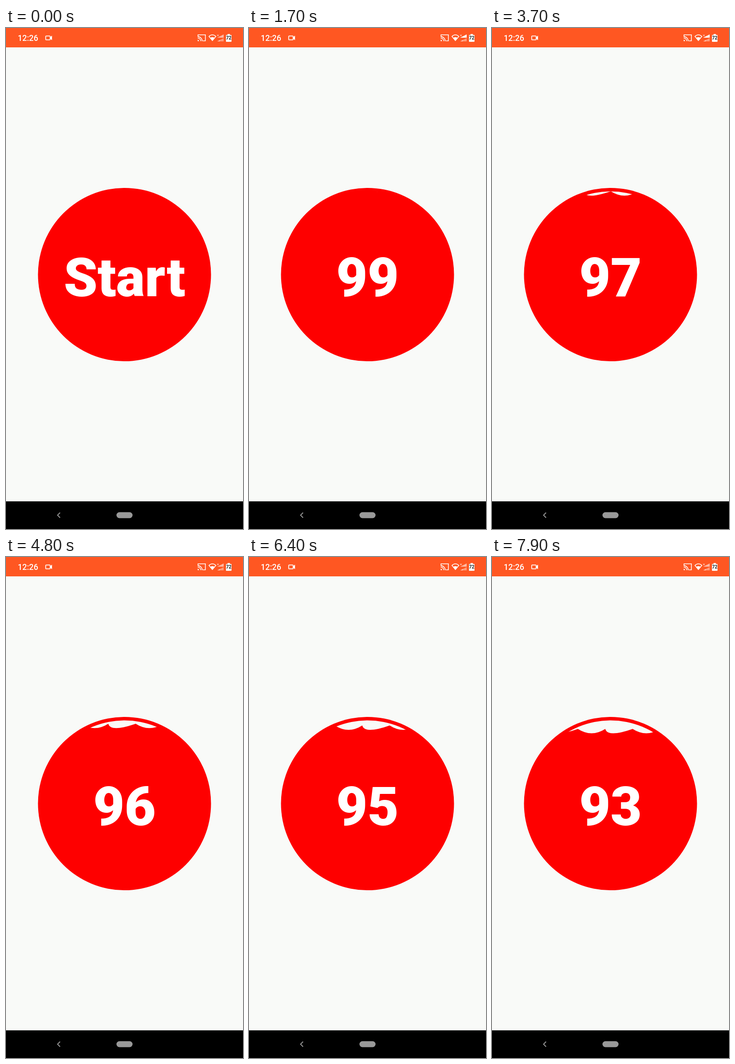
These frames come from a looping animation (515x1087 px, 8000 ms). An HTML page:

```html
<!DOCTYPE html>
<html lang="en">
<head>
<meta charset="utf-8">
<title>Countdown</title>
<style>
html, body { margin: 0; width: 100%; height: 100%; overflow: hidden; background: #f9faf8; }
svg { display: block; width: 515px; height: 1087px; font-family: Roboto, sans-serif; }
</style>
</head>
<body>
<svg viewBox="0 0 515 1087">
  <defs>
    <clipPath id="inside"><circle cx="257.5" cy="535" r="180.5"/></clipPath>
  </defs>
  <rect width="515" height="1087" fill="#f9faf8"/>

  <!-- status bar -->
  <rect width="515" height="42" fill="#ff5722"/>
  <g fill="#fff">
    <text x="25.5" y="28" font-size="17.5" font-weight="500">12:26</text>
    <path d="M96 20l4-3.5v10l-4-3.5z"/>
    <rect x="86.3" y="17.3" width="9.6" height="8.4" rx="1" fill="none" stroke="#fff" stroke-width="1.7"/>
    <g fill="none" stroke="#fff" stroke-width="1.6">
      <path d="M417.3 18v-3.2h16v12.9h-5.6M416.5 21.7a6.8 6.8 0 0 1 6.8 6.8M416.5 18.6a9.9 9.9 0 0 1 9.9 9.9"/>
    </g>
    <path d="M416.5 25.6a2.9 2.9 0 0 1 2.9 2.9h-2.9z"/>
    <path d="M441 18.2q7.5-7 15 0L448.500 27.300z" fill="none" stroke="#fff" stroke-width="1.5"/>
    <path d="M443.5 21.500q5-3.500 10 0L448.500 28z"/>
    <path d="M473 14v7h-14z" fill-opacity=".4"/>
    <path id="signal" d="M473 14v7h-14z"/>
    <path d="M473 22v7h-14z" fill-opacity=".4"/>
    <path d="M465 26v3h-6z" fill-opacity=".5"/>
    <path d="M459 14.500l3 3M462 14.500l-3 3" stroke="#fff"/>
    <path d="M481.500 13h5v2h2.500q1 0 1 1v13q0 1-1 1h-10q-1 0-1-1v-13q0-1 1-1h2.500z"/>
  </g>
  <text x="484" y="25" font-size="10" font-weight="700" text-anchor="middle" fill="#222">72</text>

  <!-- button -->
  <circle cx="257.5" cy="535" r="188" fill="#fe0000"/>
  <text id="label" x="257.5" y="581.5" font-size="117.500" font-weight="900" text-anchor="middle" fill="#fff"></text>
  <circle id="press" cx="257.5" cy="535" r="180.5" fill-opacity=".13"/>
  <path id="wave" clip-path="url(#inside)" fill="#f9faf8"/>

  <!-- navigation bar -->
  <rect y="1027" width="515" height="60"/>
  <path d="M117.500 1051.500l-5.500 5.500 5.500 5.500" fill="none" stroke="#999" stroke-width="1.8"/>
  <rect x="240" y="1050.500" width="35" height="13" rx="6.500" fill="#999"/>
</svg>
<script>
const $ = id => document.getElementById(id);
const clamp = v => Math.max(0, Math.min(1, v));
const LOOP = 8000, STEP = 100, HALF = 59.5, PERIOD = 2 * HALF;

// Seconds begun since the given moment
const ticks = (t, start) => Math.max(0, Math.floor((t - start) / 1000) + 1);

// Everything above a row of alternating skewed and even troughs
function wavePath(t) {
  const top = 346.8 + 3.76 * ticks(t, 1800);
  const shift = (198.5 + 23.8 * (t - 3700) / 100) % PERIOD;
  let d = `M${shift - PERIOD} 300V${top}`;
  for (let i = 0; i < 6; i++) {
    d += `q5 19 ${HALF} 0q${HALF / 2} 19 ${HALF} 0`;
  }
  return d + 'V300z';
}

function draw() {
  const t = Math.floor(performance.now() % LOOP / STEP) * STEP;
  const count = ticks(t, 1600);
  $('label').textContent = count ? 100 - count : 'Start';
  $('press').setAttribute('opacity', clamp((t - 400) / 300) * clamp((1700 - t) / 200));
  $('wave').setAttribute('d', t ? wavePath(t) : '');
  $('signal').setAttribute('opacity', t >= 500 && t < 4500 ? 1 : 0.3);
  requestAnimationFrame(draw);
}
draw();
</script>
</body>
</html>
```
